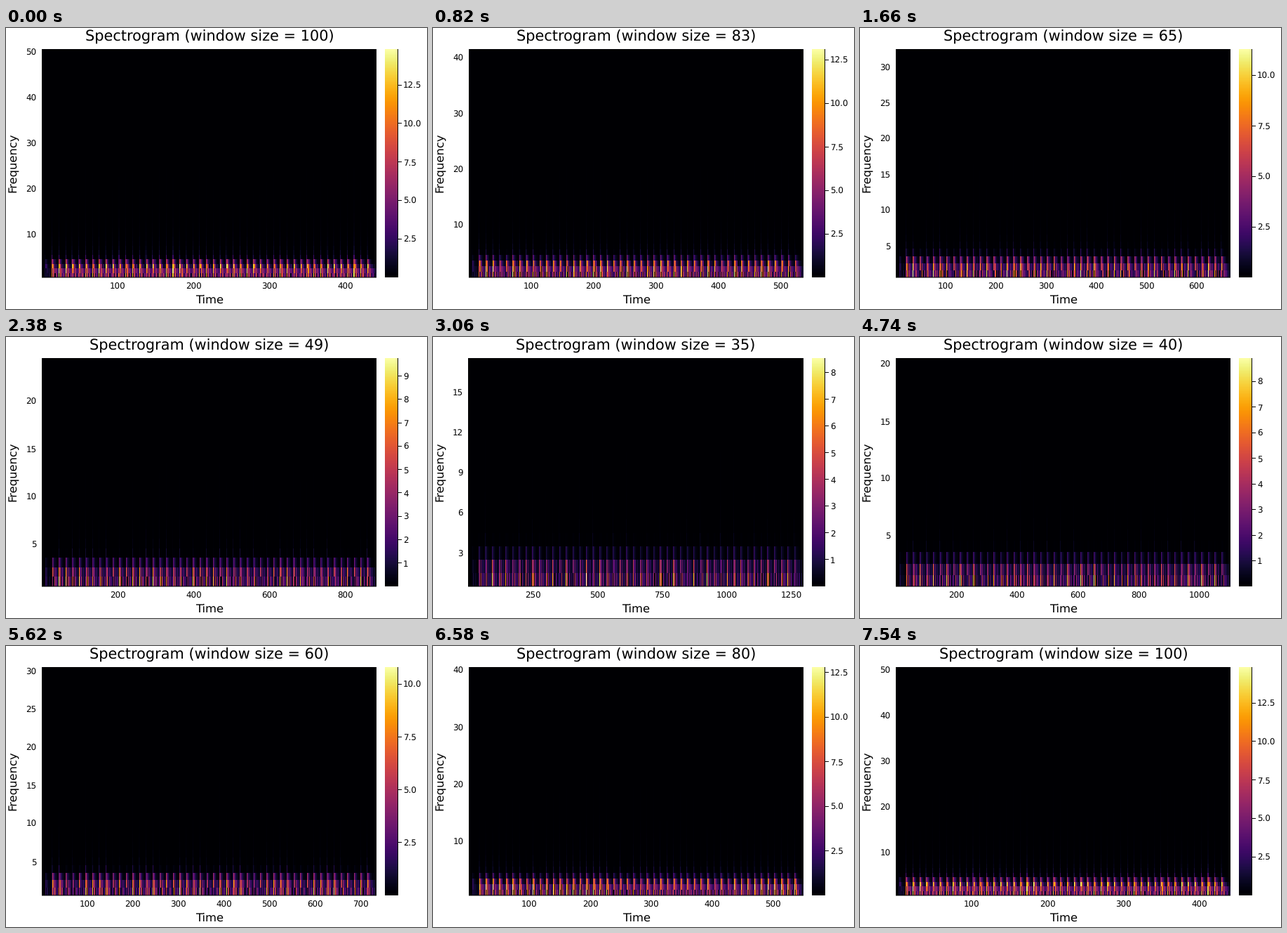
Recreate the animation shown at these times as a matplotlib script. Size 600 by 400 pixels, loop 7640 ms.

```python
import math
from functools import lru_cache

import matplotlib.pyplot as plt
import numpy as np
from matplotlib.animation import FuncAnimation

W, H, DPI = 600, 400, 100
TOP, BOTTOM, RIGHT = 30, 355, 528
TICK_MS, LOOP_MS = 20, 7640
RATE, LENGTH, PERIOD = 44100, 22050, 441
TITLE_PX, LABEL_PX, TICK_PX = 20.85, 16.35, 11.9
STEPS = ((1, 1.0), (5, 0.9), (2, 0.7), (2.5, 0.5), (3, 0.2))
INFERNO = plt.get_cmap("inferno")

plt.rcParams["font.family"] = "DejaVu Sans"
plt.rcParams["text.hinting"] = "none"


def make_signal():
    """A voiced sound: pulses with a quick high ring and a later low one."""
    rng = np.random.default_rng(7)
    wave = np.zeros(LENGTH)
    for k in range(-1, 48):
        start = 700 + PERIOD * k
        d = np.arange(min(2 * PERIOD, LENGTH - start))
        amp = 0.2 if k < 0 else rng.uniform(0.9, 1.05)
        high = np.exp(-d / 95) * np.sin(2 * np.pi * 860 / RATE * d)
        low = d / 130 * np.exp(1 - d / 130) * np.sin(2 * np.pi * 330 / RATE * d)
        wave[start:start + len(d)] += amp * (high + 0.32 * low)
    return wave


SIGNAL = make_signal()


@lru_cache(maxsize=None)
def spectrogram(size):
    hop = size - round(size / 2)
    count = (LENGTH - size) // hop + 1
    index = np.arange(count)[:, None] * hop + np.arange(size)
    spec = np.abs(np.fft.rfft(SIGNAL[index] * np.hanning(size), axis=1))
    return spec[:, :size // 2].T


@lru_cache(maxsize=None)
def heatmap(size, width):
    spec = spectrogram(size)
    colors = INFERNO(spec / spec.max(), bytes=True)
    height = BOTTOM - TOP
    rows = ((np.arange(height)[::-1] + 0.5) * spec.shape[0] / height).astype(int)
    cols = ((np.arange(width) + 0.5) * spec.shape[1] / width).astype(int)
    return colors[rows[:, None], cols]


def peak(size):
    return np.interp(size, (20, 24, 35, 40, 60, 65, 100),
                     (6.3, 6.88, 8.55, 8.92, 10.81, 11.285, 14.83))


def multiples(step, low, high):
    first, last = math.ceil(low / step), math.floor(high / step)
    return [step * i for i in range(first, last + 1)]


def nice_ticks(count):
    """Pick the tick set with the best mix of number, coverage and roundness."""
    best, best_key = [], (-1, 0)
    for power in range(4):
        for base, nice in STEPS:
            ticks = multiples(base * 10 ** power, 0.5, count + 0.5)
            if not 4 <= len(ticks) <= 8:
                continue
            number = 1 - abs(len(ticks) - 5) / 5
            cover = 1.5 * count / (ticks[-1] - ticks[0])
            score = number / 4 + cover / 3 + nice / 4
            key = (round(score, 6), -len(ticks))
            if key > best_key:
                best, best_key = ticks, key
    return best


def names(ticks):
    whole = all(v == int(v) for v in ticks)
    return [f"{v:.0f}" if whole else f"{v:.1f}" for v in ticks]


def window_at(ms):
    block, rest = divmod(ms, 140)
    i = min(3 * block + (rest >= 20) + (rest >= 120), 161)
    return 100 - i if i <= 80 else i - 61


fig = plt.figure(figsize=(W / DPI, H / DPI), dpi=DPI, facecolor="white")
ax = fig.add_axes((0, 0, 1, 1))
ax.set_axis_off()


def write(x, y, text, px, **kw):
    return ax.text(x, y, text, fontsize=px * 72 / DPI, color="black",
                   va="baseline", **kw)


def line(xs, ys):
    return ax.plot(xs, ys, color="black", lw=0.72, solid_capstyle="butt",
                   snap=False)[0]


picture = ax.imshow(heatmap(100, RIGHT - 51), extent=(51, RIGHT, BOTTOM, TOP),
                    interpolation="nearest", aspect="auto")
ramp = INFERNO(np.linspace(1, 0, BOTTOM - TOP))[:, None]
ax.imshow(ramp, extent=(540, 558, BOTTOM, TOP), interpolation="nearest",
          aspect="auto")
left_axis = line((51.5, 51.5), (TOP, BOTTOM))
bottom_axis = line((51, RIGHT), (BOTTOM, BOTTOM))
line((558.5, 558.5), (TOP, BOTTOM))
bar_marks = line((), ())
title = write(290, 19, "", TITLE_PX, ha="center")
x_name = write(290, 392, "Time", LABEL_PX, ha="center")
write(15, 192, "Frequency", LABEL_PX, ha="center", rotation=90,
      rotation_mode="anchor")
ax.set_xlim(0, W)
ax.set_ylim(H, 0)

labels = []
shown = {"size": None}


def draw_ticks(size, left):
    while labels:
        labels.pop().remove()
    rows, cols = spectrogram(size).shape
    y_ticks, x_ticks = nice_ticks(rows), nice_ticks(cols)
    for v, name in zip(y_ticks, names(y_ticks)):
        y = BOTTOM - (v - 0.5) / rows * (BOTTOM - TOP)
        labels.append(write(left - 7.5, y + 5.2, name, TICK_PX, ha="right"))
    for v, name in zip(x_ticks, names(x_ticks)):
        x = left + (v - 0.5) / cols * (RIGHT - left)
        labels.append(write(x, 372, name, TICK_PX, ha="center"))

    top = peak(size)
    step = 2.5 if top > 10 else 1
    bar_ticks = multiples(step, step, top)
    xs, ys = [], []
    for v, name in zip(bar_ticks, names(bar_ticks)):
        y = BOTTOM - v / top * (BOTTOM - TOP)
        labels.append(write(566, y + 4.8, name, TICK_PX, ha="left"))
        xs += [559, 564, np.nan]
        ys += [math.floor(y) + 0.5] * 2 + [np.nan]
    bar_marks.set_data(xs, ys)


def show(size):
    if shown["size"] == size:
        return
    shown["size"] = size
    y_names = names(nice_ticks(size // 2))
    left = 61 if "." in y_names[0] else 50 if size < 40 else 51
    picture.set_data(heatmap(size, RIGHT - left))
    picture.set_extent((left, RIGHT, BOTTOM, TOP))
    left_axis.set_xdata((left + 0.5, left + 0.5))
    bottom_axis.set_xdata((left, RIGHT))
    middle = (left + RIGHT + 1) // 2
    title.set_position((middle, 19))
    title.set_text(f"Spectrogram (window size = {size})")
    x_name.set_position((middle, 392))
    draw_ticks(size, left)


def update(i):
    show(window_at(i * TICK_MS))
    return []


def reset():
    shown["size"] = None
    show(100)
    return []


anim = FuncAnimation(fig, update, frames=LOOP_MS // TICK_MS, init_func=reset,
                     interval=TICK_MS, repeat=True, repeat_delay=0, blit=False)
plt.show()
```
